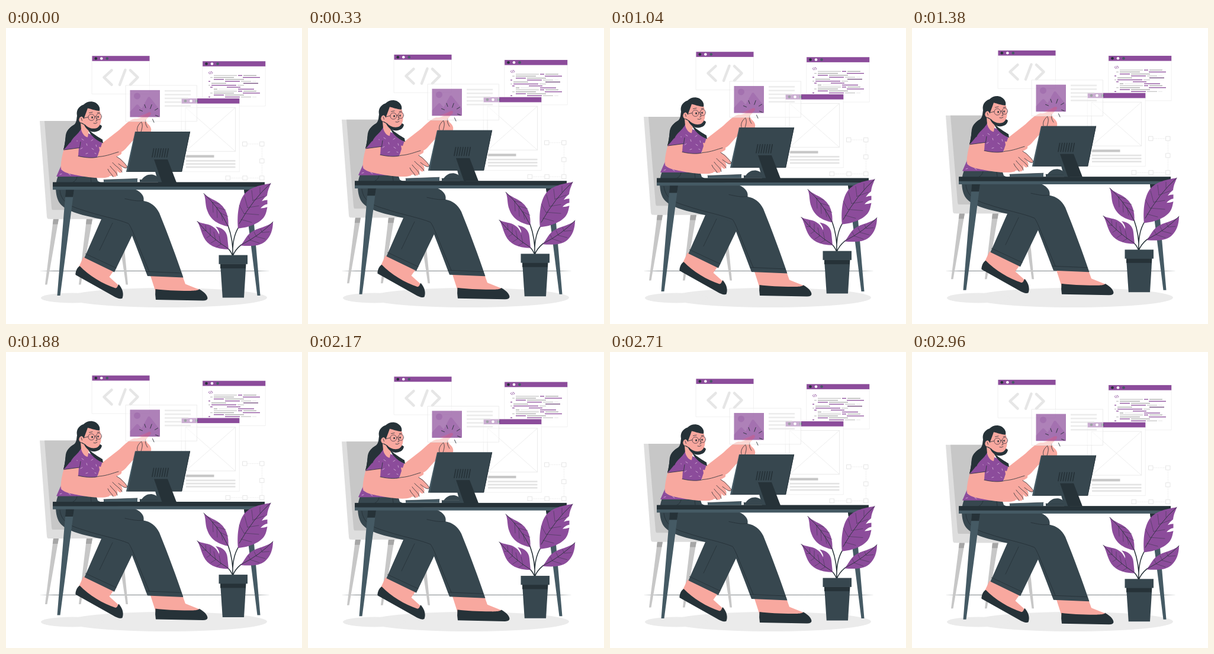
These frames come from a looping animation (500x500 px, 3 s). An HTML page with a canvas:

```html
<!DOCTYPE html>
<html lang="en">
<head>
<meta charset="utf-8">
<title>Developer at a desk</title>
<style>
html, body { margin: 0; width: 100%; height: 100%; overflow: hidden; background: #fff; }
canvas { display: block; width: 100%; height: 100%; }
</style>
</head>
<body>
<canvas id="stage"></canvas>
<script>
const canvas = document.getElementById('stage');
const ctx = canvas.getContext('2d');
const ratio = Math.max(1, window.devicePixelRatio || 1);
canvas.width = canvas.height = 500 * ratio;

const LOOP = 3000, LIFT = 10, REST = 0.4;
const INK = '#263238', SLATE = '#37474f', STEEL = '#455a64';
const PURPLE = '#8c4c9b', SKIN = '#f8a89f';
const GREY = '#c7c7c7', PALE = '#dedede', MIST = '#ebebeb';

const cache = new Map();
function path(d) {
  if (!cache.has(d)) cache.set(d, new Path2D(d));
  return cache.get(d);
}
function fill(color, d) {
  ctx.fillStyle = color;
  ctx.fill(path(d));
}
function line(color, width, d) {
  ctx.strokeStyle = color;
  ctx.lineWidth = width;
  ctx.stroke(path(d));
}
function rect(color, x, y, w, h) {
  ctx.fillStyle = color;
  ctx.fillRect(x, y, w, h);
}
function frame(color, x, y, w, h) {
  ctx.strokeStyle = color;
  ctx.lineWidth = 0.7;
  ctx.strokeRect(x, y, w, h);
}
function oval(color, x, y, rx, ry = rx) {
  ctx.fillStyle = color;
  ctx.beginPath();
  ctx.ellipse(x, y, rx, ry, 0, 0, Math.PI * 2);
  ctx.fill();
}

function ground() {
  oval(MIST, 272, 455.5, 169, 16.5);
  oval(MIST, 112, 456, 53, 8.5);
  const fade = ctx.createLinearGradient(58, 0, 444, 0);
  fade.addColorStop(0, 'rgba(38,50,56,.1)');
  fade.addColorStop(0.06, 'rgba(38,50,56,.75)');
  fade.addColorStop(0.94, 'rgba(38,50,56,.75)');
  fade.addColorStop(1, 'rgba(38,50,56,.1)');
  line(fade, 0.8, 'M58 410.4H444');
}

function browser(x, y, w, h) {
  rect('#fff', x, y, w, h);
  frame(MIST, x, y, w, h);
  rect(PURPLE, x, y, w, 8.6);
  [INK, '#fff', STEEL].forEach((c, i) => oval(c, x + 6.3 + i * 9.5, y + 4.3, 2.3));
}

// Each row: x, length, colour index, repeated
const codeRows = [
  [351, 39, 0, 392, 7, 1, 401, 22, 2],
  [345, 4, 0, 351, 34, 2, 400, 29, 1],
  [351, 17, 1, 370, 32, 2],
  [342, 3, 1, 370, 25, 1, 397, 17, 0, 416, 7, 3],
  [347, 25, 2, 401, 25, 4],
  [342, 3, 0, 347, 42, 1, 391, 11, 0],
  [345, 4, 1, 373, 23, 1],
  [351, 6, 2, 359, 31, 3, 392, 27, 1]
];
const codeColors = [GREY, PURPLE, '#aaa', MIST, '#6e4779'];

function windows() {
  browser(145.5, 46.8, 97, 64.3);
  line('#e6e6e6', 4.5, 'M178.5 71L165.5 83L178.5 95.5M201.5 70.5L192 95.5M210 71L222.5 83L210 95.5');

  browser(332.2, 55.8, 106, 75.8);
  line(PURPLE, 0.8, 'M344 73.5L342 75.2L344 77M346.4 73L344.9 77.3M347.2 73.5L349.2 75.2L347.2 77');
  for (let r = 0; r < 12; r++) {
    const row = codeRows[r < 8 ? r : r - 8];
    for (let i = 0; i < row.length; i += 3)
      rect(codeColors[row[i + 2]], row[i], 79.2 + r * 3.3, row[i + 1], 1.3);
  }

  browser(296.7, 118.6, 97.6, 123.8);
  frame('#e2e2e2', 303.5, 134, 84, 74);
  line('#e6e6e6', 0.7, 'M303.5 134L387.5 208M387.5 134L303.5 208');
  rect(GREY, 304, 214.2, 47.5, 4.2);
  for (let i = 0; i < 3; i++) rect('#e4e4e4', 304, 222.6 + i * 5.3, 83.5, 2.7);

  ctx.setLineDash([2.5, 1.5]);
  line(MIST, 0.7, 'M403.5 195.5H432.5V253H375');
  ctx.setLineDash([]);
  for (const [x, y] of [[403.5, 195.5], [432.5, 195.5], [432.5, 224.2], [432.5, 253], [403.8, 253], [375, 253]]) {
    rect('#fff', x - 3.5, y - 3.5, 7, 7);
    frame('#dcdcdc', x - 3.5, y - 3.5, 7, 7);
  }
}

function chair() {
  fill(GREY, 'M80 322H89L69.5 433H66ZM136 322H146L126.5 433H123ZM186 322H195L206 433H202.5Z');
  fill('#a6a6a6', 'M80 322H89L87.4 331H78.8ZM136 322H146L144.4 331H135Z');
  fill(PALE, 'M57 156.5H128L150 322H71.5Q69.5 322 69 318Z');
  fill(GREY, 'M65 156.5H130L150 307H79Q77.5 307 77 303Z');
  fill(PALE, 'M74 307H180V322H74Z');
}

function farArm() {
  fill(SKIN, 'M155 200C166 191 181 180 192 171C203 161 210 154 217 152.8C225 154 233 148 239 143C244 140 247 143 243.5 147L236 155L239 161C244 165 246 169 245 174L240 190H214L205 200C201 205 197 208 193 210L155 219Z');
  line(INK, 0.8, 'M222 174C220 167 225 161 229 158M229 159C232 164 229 171 228 175M236 155C234 159 237 165 239 168');
}

function pictureCard() {
  rect('rgba(255,255,255,.55)', 202.5, 96.6, 120, 60.8);
  frame('#e6e6e6', 202.5, 96.6, 120, 60.8);
  ctx.globalAlpha = 0.7;
  rect(PURPLE, 209.5, 104.5, 50.5, 45.5);
  ctx.globalAlpha = 0.3;
  oval(PURPLE, 221.5, 114.5, 5.5);
  fill(PURPLE, 'M209.5 150V141L220 129.5Q222 128 224 130L229 136L239.5 117Q241.5 114.5 243.5 117L260 138V150Z');
  // Fingertip glows through the picture
  ctx.globalAlpha = 0.45;
  fill('#d8608f', 'M222 150L239 143C244 140 247 143 243.5 147L240 150Z');
  ctx.globalAlpha = 1;
  [44, 44, 40, 28, 44].forEach((w, i) => rect('rgba(224,224,224,.6)', 268, 104.5 + i * 6.35, w, 2.6));
  line(INK, 0.9, 'M225.5 138L230.5 140M234 129L236 134.5M246.2 129L243.7 136M251.5 138.5L256.5 135.5M252.5 147L257.5 149M247.5 153.5L250 159');
}

function legs() {
  // Far leg and shoe
  fill(SKIN, 'M131 386L123 403L182 447L191 441L190 434L174.5 420L183 408Z');
  fill(INK, 'M124.5 401.5C119 405 117 413 117.5 416.5L179 451C187 456 194 458 196.5 456C199 450 198 441 190.5 432.5C188 435 189 438 185 439C164 432 140 418 124.5 401.5Z');
  fill(SLATE, 'M163 318L132.5 387.5L183 412L214 348L216 322Z');
  line(INK, 0.8, 'M134.5 381L186 405M180 329L158 375');
  // Near leg and shoe
  fill(SKIN, 'M244 418L253 446L320 450L328 442L303 432L298 418Z');
  fill(INK, 'M252.5 440.5Q251.5 450 253 458.5L333 460.1Q340 460 340.5 456C340 450 334 445 327 441C326 439.5 328 444 309 443.5C286 443.5 267 442.5 252.5 440.5Z');
  fill(SLATE, 'M88 249H152L155 258C170 267 196 267 218 272C230 277 234 285 232.3 291.5C244 293.5 253 300 259 312C274 349 288 387 299.5 421L239 418.5C229 392 217 361 209 340C203 329 188 329 163 323C130 316 103 310 92 297C83 286 82 264 88 249Z');
  line(INK, 0.9, 'M91 274C93 291 104 300 129 307C158 317 188 322 207 330C213 338 219 357 242 411M232 291C222 293 211 290 201 288M237 411L296 413.5M120 251C119 256 116 259 113 260M143 251L144 260');
}

function torso() {
  fill(PURPLE, 'M128 168C117 172 110 182 104 191L97.5 206L94 230L85 250.5H154L153 221L158 206C157 195 151 186 145 180L136 176Z');
  // Hair over the back and under the jaw
  fill(INK, 'M123 142C117 149 122 156 115 163C107 168 101 173 100.5 184C100 192 99 198 97 205C103 204 107 199 109 193C112 184 121 181 128 168L134 160Z');
  line(INK, 1, 'M116 163C98 171 103 188 97.5 205');
  fill(SKIN, 'M126 160L127 171C129 180 135 184 138 184L141 168Z');
  fill(INK, 'M133 161C135 170 142 173 146 177C153 182 160 186 163 188L164 194C155 192 146 185 140 174Z');
  fill(PURPLE, 'M143 179C150 187 158 192 162.5 193.5L160 201L152 199Z');
  ctx.save();
  ctx.clip(path('M126 173L107 196L98 206H122V218H154L158 202L145 182ZM94 230L85 251H155V240Z'));
  line('#d3aed6', 0.9, 'M121 176L124 175M107 196L110 195M120 190L121 193M128 187L131 189M126 204L129 202M136 195L137 198M144 190L147 188M145 203L148 205M135 212L138 211M152 197L153 200M115 199L118 198M93 238L95 240M91 247L94 246M106 246L109 248M122 248L125 247M140 247L143 249M150 211L152 212');
  ctx.restore();
}

function nearArm() {
  fill(SKIN, 'M98 204L123 202L122 216C136 219 147 220 157 217C169 216 178 211 188 208.5C195 207 197 210 194 213L187 217L194 221C199 226 204 231 205 235C201 238 198 235 194 232C198 238 197 243 194 244C191 245 189 242 187 239C190 245 188 250 184 251C180 252 177 247 174 251C163 255 139 252 119 248C102 245 92 242 92.5 233C93 224 95 213 98 204Z');
  fill(PURPLE, 'M108 193L97.5 205.5L124.5 202L127 190Z');
  line(INK, 0.8, 'M98 205.5L124.5 202L126 192M122 216C139 220 150 219 157 217C171 216 182 211 190 209M187 217L193 221C198 226 203 230 205 235C201 238 197 234 190 229M180 227C185 233 193 237 196 243M176 233C180 239 187 243 188 249M172 238C174 244 180 247 181 251');
}

function head() {
  fill(INK, 'M130 158C133 169 141 176 150 175C157 174 161 171 162 165L155 160Z');
  oval(SKIN, 127.5, 154.5, 4.2, 5.2);
  fill(SKIN, 'M130 140C137 130 156 132 159 141C162 153 161 163 155 167.5C148 172 138 168 134 163L127 159Z');
  fill(INK, 'M121 151C117 140 122 132 131 129C138 122 150 122 156 130C159 134 158.5 138 158 139.5C150 139 143 136 138 135C136 141 133 148 131.5 153C128 147 124 148 124 153Z');
  line(INK, 0.8, 'M127 152L128.5 156M131 152L139 150M149.5 150Q151 148 152.2 149M152 151L154 156L151.5 157M148 160.5Q151 162 154 159.5M140.5 143L146 141.8M154.2 143L158 142.3');
  line('#5d4650', 0.9, 'M149.7 150.5A5.4 5.4 0 1 1 138.9 150.5A5.4 5.4 0 1 1 149.7 150.5M161.5 149.3A4.6 5.2 0 1 1 152.3 149.3A4.6 5.2 0 1 1 161.5 149.3');
  oval(INK, 145.6, 150.7, 1.3, 1.8);
  oval(INK, 155.5, 149.7, 1.2, 1.7);
}

function desk() {
  rect(INK, 79, 260, 358, 8);
  rect(STEEL, 79, 267.6, 358, 5.2);
  fill(STEEL, 'M101 272.5H115L91.5 451.5H86.5ZM402 272.5H414L429.5 451.5H424.5Z');
  fill(INK, 'M101 272.8H115L113.2 285H100ZM402 272.8H414L415.2 285H404Z');
}

function computer() {
  fill(STEEL, 'M165 256L222 254V260H165Z');
  line(INK, 0.7, 'M165 256L222 254');
  fill(SLATE, 'M226 255.8H262V260.2H226Z');
  line(INK, 0.6, 'M226 256H262');
  fill(SLATE, 'M229 256C233 250 239 246.5 247 247.2C253 248 257 252 259 256Z');
  fill(STEEL, 'M218 174.6H311L297 242.4H203Z');
  fill(SLATE, 'M219 174.6H311L297 242.4H206Z');
  line(INK, 0.7, 'M310.7 174.8L296.8 242.2H203.4');
  for (let i = 0; i < 7; i++) {
    const x = 247 + i * 4.1;
    line(INK, 1.7, `M${x + 2.6} 203.5L${x} 217.5`);
  }
  fill(SLATE, 'M246.5 221.5H255L267 260.5H257Z');
  fill(INK, 'M250 221.5H273L288 260.5H263.5Z');
}

function plant() {
  line(INK, 1.5, 'M383 385C384 364 380 347 375 333M383 385C382 362 386 347 393 336M383 385C381 379 379 376 375 372M383 385C386 376 391 371 397 366');
  fill(PURPLE, 'M334 279C342 287 354 290 362 297C373 306 376.5 320 375.5 335C359 331 346 325 340 308C336 298 338 288 334 279Z');
  fill(PURPLE, 'M447.5 262C431 264.5 412 268 401.5 281.5C392 295 390 319 392 338C408 337 427 330 435 320C439 315 440 309 441.5 302Q436 304 430 304Q435 298 441.5 297V290Q437 290 432 292Q436 286 441 282.5C442 274 445 268 447.5 262Z');
  fill(PURPLE, 'M323 326C331 331 343 329 352 337C357 341 358 345 360 348C361 344 357 338 354 335C366 337 373 343 374 354L376 373.5C354 373 340 366 334 353C329 343 328 334 323 326Z');
  fill(PURPLE, 'M451 327C442 336 425 336 412 346C405 352 402 361 396 367C411 368 428 369 438 360C447 352 451 340 451 327Z');
  line(INK, 0.9, 'M334 279Q359 302 375 334M447 262Q417 289 394 330M323 326Q347 355 375 372M451 327Q429 350 397 366');
  line('rgba(38,50,56,.75)', 0.6, 'M349 294L350 311M356 302L357 320M363 311L366 325M349 294L361 297M357 303L371 307M364 313L375 318M429 279V269M417 291L415 274M408 303L403 284M402 313L394 299M417 291L436 284M408 303L427 300M402 313L427 315M397 323L415 328M338 342L337 333M345 350L345 337M354 358L351 344M363 365L360 351M338 342L332 342M345 350L339 354M354 358L346 363M363 365L356 369M433 345L430 339M423 352L419 344M413 358L409 351M433 345L445 344M423 352L438 356M413 358L428 363');
  fill(SLATE, 'M362 398H405.5L402 455H365.8Z');
  rect(INK, 362, 398, 43, 7.6);
  rect(SLATE, 359.5, 383.2, 48.5, 15.2);
}

function scene() {
  windows();
  chair();
  farArm();
  pictureCard();
  legs();
  torso();
  head();
  nearArm();
  computer();
  desk();
  plant();
}

function draw(now) {
  const p = (now % LOOP) / LOOP;
  const lift = LIFT * (1 - Math.abs(1 - 2 * p));
  ctx.setTransform(ratio, 0, 0, ratio, 0, 0);
  rect('#fff', 0, 0, 500, 500);
  ctx.lineCap = ctx.lineJoin = 'round';
  ground();
  ctx.translate(0, REST - lift);
  scene();
}

const start = performance.now();
function tick() {
  draw(performance.now() - start);
  requestAnimationFrame(tick);
}
tick();
</script>
</body>
</html>
```
